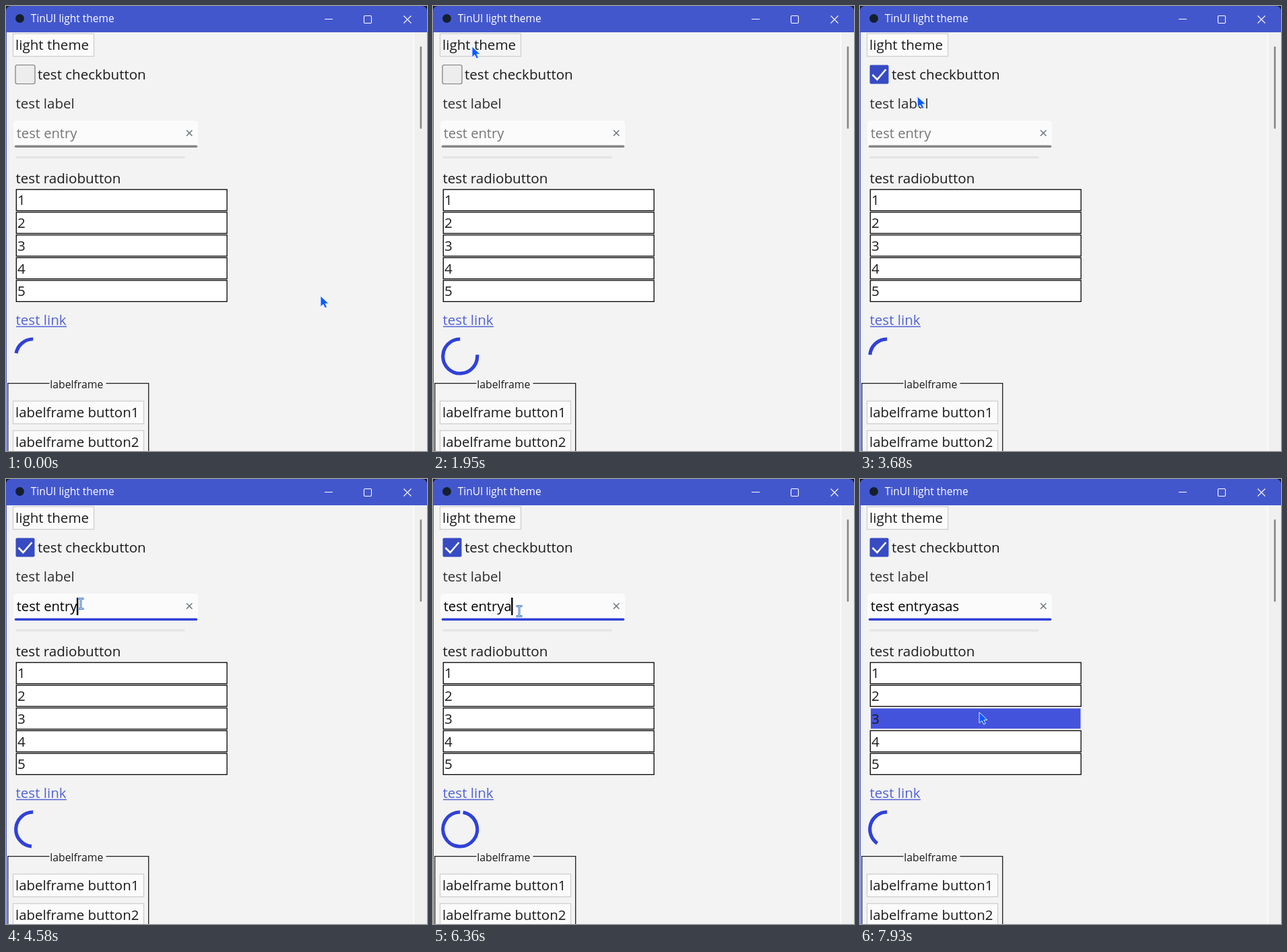
Write an HTML page that moves like this. It is 625 px wide and 660 px high and loops after 7.99 s.

```html
<!DOCTYPE html>
<html lang="en">
<head>
<meta charset="utf-8">
<title>TinUI light theme</title>
<style>
  html, body { margin: 0; width: 100%; height: 100%; overflow: hidden; background: #f3f3f3; }
  svg { display: block; width: 100%; height: 100%; }
  text { font: 20.6px "Open Sans", "Noto Sans", sans-serif; fill: #1b1b1b; white-space: pre; }
  .small { font-size: 15.8px; }
  .box { fill: #fbfbfb; stroke: #cfcfcf; stroke-width: 1.3; }
  .line { fill: none; stroke: #1b1b1b; stroke-width: 1.3; }
  .caption { fill: none; stroke: #fff; stroke-width: 1.1; }
</style>
</head>
<body>
<svg viewBox="0 0 625 660" xmlns="http://www.w3.org/2000/svg">
  <rect width="625" height="20" fill="#15161c"/>
  <rect y="30" width="625" height="630" fill="#f3f3f3"/>
  <path d="M0 39V8Q0 0 8 0H617Q625 0 625 8V39Z" fill="#4357cd"/>
  <rect y="39" width="1" height="621" fill="#4357cd"/>
  <rect x="604.5" y="39" width="2" height="621" fill="#fbfbfb"/>
  <rect x="606.5" y="39" width="18.5" height="621" fill="#f0f0f0"/>
  <rect x="614.6" y="60" width="2.6" height="122" rx="1" fill="#868686"/>

  <circle cx="20.5" cy="18.5" r="6.5" fill="#14202e"/>
  <text x="36.8" y="24.4" style="font-size:15.5px;fill:#fff">TinUI light theme</text>
  <path class="caption" d="M473 19.5H485M590.5 14.5L601.5 25.5M601.5 14.5L590.5 25.5"/>
  <rect class="caption" x="531.5" y="14.5" width="11" height="11" rx="1.5"/>

  <rect id="button" class="box" x="10.5" y="41" width="120" height="33.6"/>
  <text x="14" y="65">light theme</text>

  <rect id="check" x="14" y="87.5" width="29" height="28" rx="2.5" stroke="#7c7c7c" stroke-width="1.2"/>
  <g id="checked">
    <rect x="14.5" y="87.5" width="28" height="28" rx="2" fill="#374bc2"/>
    <path d="M18.5 102L25.5 109L38.5 94" fill="none" stroke="#fff" stroke-width="2.6"/>
  </g>
  <text x="47" y="109">test checkbutton</text>
  <text x="14.5" y="151.5" style="fill:#2e2e2e">test label</text>

  <rect x="11" y="170" width="274" height="40" rx="5" fill="#fbfbfb"/>
  <path id="rule" d="M14.5 208.2H282.5" stroke-width="3.6" stroke-linecap="round"/>
  <text id="entry" x="15.7" y="196.4" style="font-size:20.2px"></text>
  <path d="M268 184.2L276.4 192.6M276.4 184.2L268 192.6" stroke="#737a80" stroke-width="1.5"/>
  <rect id="caret" y="176" width="2.4" height="26" fill="#000"/>
  <path d="M16 224.5H264" stroke="#e5e5e5" stroke-width="3.6" stroke-linecap="round"/>

  <text x="14.5" y="263">test radiobutton</text>
  <g id="rows"></g>

  <text x="14.5" y="473" style="fill:#5062d3">test link</text>
  <path d="M15 475.5H90" stroke="#5062d3" stroke-width="1.3"/>
  <path id="arc" fill="none" stroke="#3041d8" stroke-width="5.2"/>

  <path class="line" d="M64.5 559.7H2.7V662M148.5 559.7H211.7V662"/>
  <text class="small" x="65.2" y="566.6">labelframe</text>
  <rect class="box" x="10.5" y="586" width="194" height="33.6"/>
  <text x="14" y="610" style="font-size:20.4px">labelframe button1</text>
  <rect class="box" x="10.5" y="629.7" width="194" height="33.6"/>
  <text x="14" y="653.7" style="font-size:20.4px">labelframe button2</text>

  <path id="arrow" d="M0 0V16L3.9 12.6L6.6 18L9.4 16.6L6.9 11.4H12Z" fill="#0a5cff" stroke="#dcebff" stroke-width="1"/>
  <g id="beam" fill="none">
    <path d="M-4.5 -7.5H4.5M0 -7.5V7.5M-4.5 7.5H4.5" stroke="#4a78b8" stroke-width="3"/>
    <path d="M-4 -7.5H4M0 -7.5V7.5M-4 7.5H4" stroke="#b9d8ff" stroke-width="1.2"/>
  </g>
</svg>
<script>
const LOOP = 7990, CLICK_CHECK = 3150, CLICK_ENTRY = 4290;
const KEYS = [6290, 6540, 6790, 7060];
const ROW_TOP = 272.2, ROW_STEP = 33.7;
// time, x, y
const PATH = [
  [0, 467, 430], [90, 467, 430], [480, 300, 210], [860, 137, 50], [960, 60, 59], [1010, 58, 60],
  [2150, 58, 60], [2550, 68, 94], [2850, 73, 106], [3480, 73, 106], [4050, 108, 186],
  [4580, 111, 185], [5070, 111, 185], [5600, 128, 196], [6900, 128, 196],
  [7380, 170, 264], [7780, 177, 346], [LOOP, 177, 346]
];
const $ = id => document.getElementById(id);
const show = (node, on) => node.setAttribute("visibility", on ? "visible" : "hidden");
const place = (node, x, y) => node.setAttribute("transform", `translate(${x.toFixed(1)} ${y.toFixed(1)})`);

$("rows").innerHTML = [1, 2, 3, 4, 5].map((n, i) => {
  const y = ROW_TOP + i * ROW_STEP;
  return `<rect x="15.3" y="${y}" width="312.8" height="31.4" stroke-width="1.3"/>
    <text x="17" y="${y + 23.2}">${n}</text>`;
}).join("");
const rows = [...$("rows").querySelectorAll("rect")];

function pointer(t) {
  const i = PATH.findIndex(p => p[0] > t);
  const [t0, x0, y0] = PATH[i - 1], [t1, x1, y1] = PATH[i];
  const k = (t - t0) / (t1 - t0);
  return { x: x0 + (x1 - x0) * k, y: y0 + (y1 - y0) * k };
}

// Grows counter-clockwise from the top in steps of five degrees
function drawArc(t) {
  const angle = Math.round((82 + t * 0.0986) / 5) * 5 % 360;
  const a = angle * Math.PI / 180, r = 25.5, cx = 40.2, cy = 519.5;
  $("arc").setAttribute("d", `M${cx} ${cy - r}A${r} ${r} 0 ${angle > 180 ? 1 : 0} 0 ` +
    `${cx - r * Math.sin(a)} ${cy - r * Math.cos(a)}`);
}

function drawEntry(t) {
  const active = t >= CLICK_ENTRY;
  const typed = KEYS.filter(k => k <= t);
  const entry = $("entry");
  entry.textContent = "test entry" + "asas".slice(0, typed.length);
  entry.style.fill = active ? "#000" : "#757575";
  $("rule").setAttribute("stroke", active ? "#3041d8" : "#868686");
  const since = t - (typed.length ? typed[typed.length - 1] : CLICK_ENTRY);
  show($("caret"), active && since % 900 < 600);
  $("caret").setAttribute("x", 15.2 + entry.getComputedTextLength());
}

function draw(t) {
  const { x, y } = pointer(t);
  const inside = (l, top, r, b) => x >= l && x <= r && y >= top && y <= b;

  $("button").style.fill = inside(10, 40, 131, 75) ? "#f4f4f4" : "#fbfbfb";
  $("check").setAttribute("fill", inside(13, 87, 209, 116) ? "#e5e5e5" : "#ededed");
  show($("check"), t < CLICK_CHECK);
  show($("checked"), t >= CLICK_CHECK);
  drawEntry(t);
  drawArc(t);

  rows.forEach((row, i) => {
    const top = ROW_TOP + i * ROW_STEP;
    const hot = inside(15, top, 328, top + 31.4);
    row.setAttribute("fill", hot ? "#4453dc" : "#fff");
    row.setAttribute("stroke", hot ? "#f3f3f3" : "#000");
  });

  const overEntry = inside(11, 170, 285, 210);
  show($("arrow"), !overEntry);
  show($("beam"), overEntry);
  place($("arrow"), x, y);
  place($("beam"), x, y);
}

function tick() {
  draw(performance.now() % LOOP);
  requestAnimationFrame(tick);
}
tick();
</script>
</body>
</html>
```
